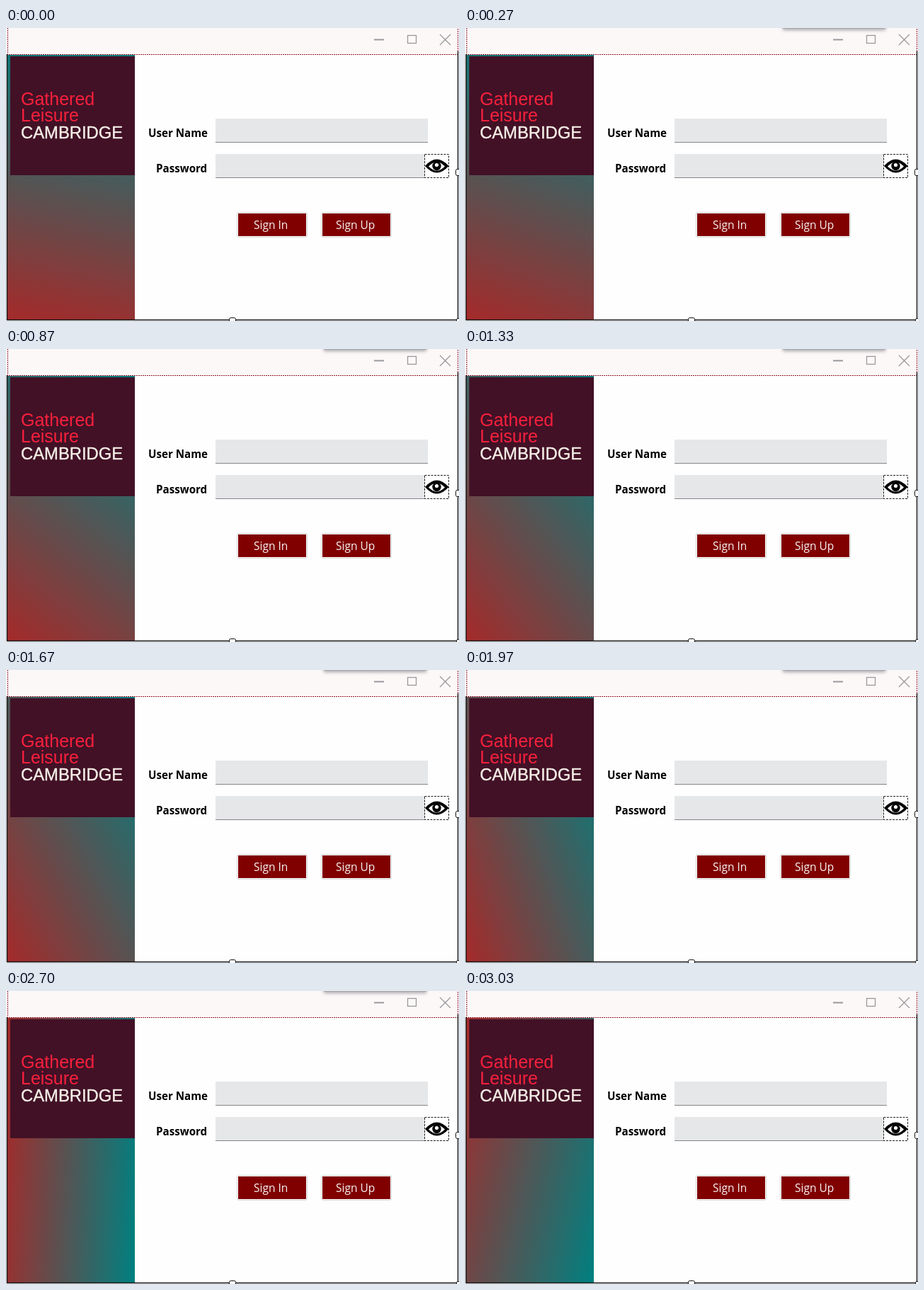
These frames come from a looping animation (640 px wide and 414 px high, 3.06 s). An HTML page:

```html
<!DOCTYPE html>
<html lang="en">
<head>
<meta charset="utf-8">
<title>Sign in</title>
<style>
  html, body { margin: 0; width: 100%; height: 100%; overflow: hidden; background: #fefefe; }
  svg { display: block; width: 640px; height: 414px; }
  .brand { font: 25px "Liberation Sans", Arial, sans-serif; fill: #f8203c; }
  .brand .city { font-size: 23.8px; fill: #f6f0e8; stroke: #f6f0e8; stroke-width: .4px; }
  .label { font: bold 15.15px "Open Sans", "Noto Sans", sans-serif; fill: #000; }
  .button { font: 15.5px "Open Sans", "Noto Sans", sans-serif; fill: #f8f4f4; }
</style>
</head>
<body>
<svg viewBox="0 0 640 414" xmlns="http://www.w3.org/2000/svg">
  <defs>
    <linearGradient id="sweep" gradientUnits="userSpaceOnUse">
      <stop offset="0" stop-color="brown"/>
      <stop offset="1" stop-color="teal"/>
    </linearGradient>
    <filter id="soft" x="-10%" y="-200%" width="120%" height="500%">
      <feGaussianBlur stdDeviation="2.6"/>
    </filter>
    <g id="frame">
      <rect x=".5" y=".5" width="99" height="35" rx="2.5" fill="#fefefe" stroke="#d4d4d4"/>
      <rect x="2" y="2" width="96" height="32" fill="maroon"/>
    </g>
  </defs>

  <rect width="640" height="414" fill="#fefefe"/>
  <rect x="3" width="635" height="37" fill="#fdf8f8"/>
  <g id="popup">
    <rect x="449" y="-6" width="145" height="9" fill="#808088" opacity=".7" filter="url(#soft)"/>
    <path d="M449 .5H594" stroke="#a8a8ac"/>
  </g>

  <!-- window controls -->
  <g fill="none" stroke="#98989c" stroke-width="1.3">
    <path d="M520 16.5H534" stroke-width="2"/>
    <rect x="567.5" y="10.5" width="12" height="11"/>
    <path d="M613 9L628 24M628 9L613 24"/>
  </g>

  <!-- side panel -->
  <rect x="2" y="38" width="180" height="374" fill="url(#sweep)"/>
  <rect x="6" y="40" width="176" height="168" fill="#421126"/>
  <g class="brand">
    <text x="21" y="109">Gathered</text>
    <text x="21" y="132">Leisure</text>
    <text x="21" y="156" class="city">CAMBRIDGE</text>
  </g>

  <!-- form -->
  <g class="label">
    <text x="201" y="154">User Name</text>
    <text x="212" y="204">Password</text>
  </g>
  <g fill="#e6e7e9">
    <rect x="296" y="128" width="300" height="33"/>
    <rect x="296" y="178" width="296" height="33"/>
  </g>
  <path d="M296 161.5H596M296 211.5H592" stroke="#848488"/>
  <rect x="591.5" y="178.5" width="34" height="33" fill="#fefefe" stroke="#202020" stroke-dasharray="3 1.5"/>
  <path d="M592 195Q608.5 176 625.5 195Q608.5 214 592 195Z"/>
  <path d="M597 195.5Q608.5 183.5 620 195.5Q608.5 207.5 597 195.5Z" fill="#fefefe"/>
  <circle cx="608.5" cy="195" r="6.2"/>
  <circle cx="608.5" cy="193.5" r="2.6" fill="#fefefe"/>

  <use href="#frame" x="326" y="260"/>
  <use href="#frame" x="445" y="260"/>
  <g class="button">
    <text x="350" y="284">Sign In</text>
    <text x="466" y="284">Sign Up</text>
  </g>

  <!-- selection border and handles -->
  <path d="M2.5 0V37.5H638.5V0" fill="none" stroke="#90182c" stroke-dasharray="2 1"/>
  <path d="M1.5 37V412.5H638.5V33" fill="none" stroke="#141414" stroke-width="1.4"/>
  <g fill="#fefefe" stroke="#101010">
    <rect x="315.5" y="409.5" width="9" height="9" rx="2"/>
    <rect x="635.5" y="199.5" width="9" height="9" rx="2"/>
    <rect x="636.5" y="410.5" width="9" height="9" rx="2"/>
  </g>
</svg>
<script>
  const LOOP = 3060;
  const STEP = 100 / 3;
  const START_ANGLE = 12;
  const panel = { x: 2, y: 37, w: 180, h: 376 };
  const byId = id => document.getElementById(id);
  const sweep = byId("sweep"), popup = byId("popup");

  // Corner-to-corner gradient line; degrees run clockwise from straight up.
  function aimGradient(degrees) {
    const a = degrees * Math.PI / 180;
    const dx = Math.sin(a), dy = -Math.cos(a);
    const half = (Math.abs(panel.w * dx) + Math.abs(panel.h * dy)) / 2;
    const cx = panel.x + panel.w / 2, cy = panel.y + panel.h / 2;
    const line = { x1: cx - dx * half, y1: cy - dy * half, x2: cx + dx * half, y2: cy + dy * half };
    for (const key in line) sweep.setAttribute(key, line[key].toFixed(2));
  }

  function render(time) {
    const tick = Math.floor(time / 10) * 10;
    aimGradient(START_ANGLE + Math.floor((tick + 5) / STEP));
    const open = tick >= 270 && tick < 2870;
    popup.setAttribute("visibility", open ? "visible" : "hidden");
  }

  const begin = performance.now();
  function loop() {
    render((performance.now() - begin) % LOOP);
    requestAnimationFrame(loop);
  }
  loop();
</script>
</body>
</html>
```
